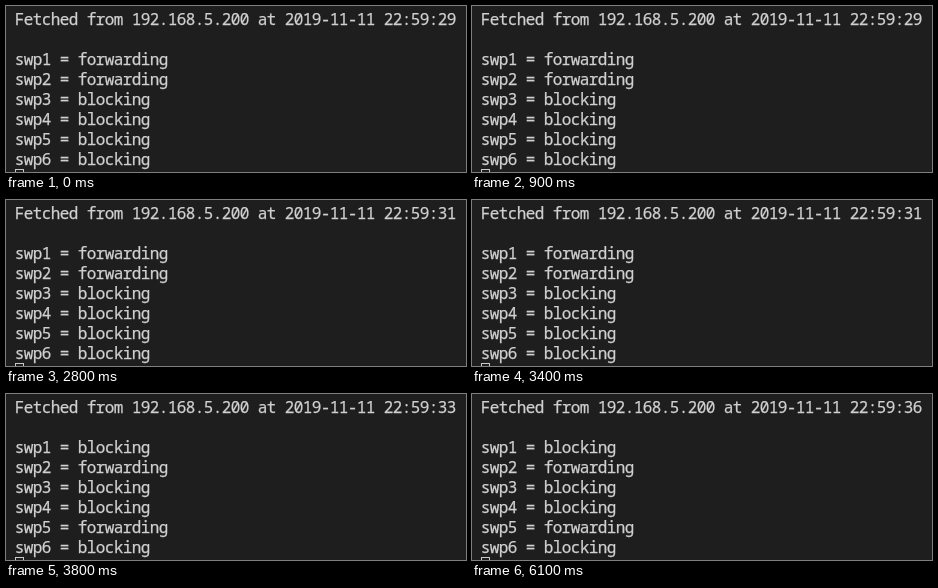
These frames come from a looping animation (460x166 px, 7.2 s). An HTML page:

```html
<!DOCTYPE html>
<html lang="en">
<head>
<meta charset="utf-8">
<title>Port states</title>
<style>
  html, body { margin: 0; width: 100%; height: 100%; overflow: hidden; background: #1e1e1e; }
  svg { display: block; width: 460px; height: 166px; }
  text {
    font: 16px "Noto Sans Mono", "DejaVu Sans Mono", monospace;
    letter-spacing: -.6px; /* 9px cells */
    fill: #d0d0d0; stroke: #d0d0d0; stroke-width: .25px;
    white-space: pre;
  }
  .cursor { fill: none; stroke: #c8c8c8; }

  /* Hard switches on one 7.2 s clock: 1.6 s, 3.6 s, 3.7 s and 5.6 s */
  .timed { visibility: hidden; animation: 7.2s step-end infinite; }
  .first  { animation-name: first; }
  .second { animation-name: second; }
  .third  { animation-name: third; }
  .fourth { animation-name: fourth; }
  .before { animation-name: before; }
  .empty  { animation-name: empty; }
  .after  { animation-name: after; }
  .filled { animation-name: filled; }
  @keyframes first  { 0% { visibility: visible } 22.222%, 100% { visibility: hidden } }
  @keyframes second { 0% { visibility: hidden } 22.222% { visibility: visible } 50%, 100% { visibility: hidden } }
  @keyframes third  { 0% { visibility: hidden } 50% { visibility: visible } 77.777%, 100% { visibility: hidden } }
  @keyframes fourth { 0% { visibility: hidden } 77.777%, 100% { visibility: visible } }
  @keyframes before { 0% { visibility: visible } 50%, 100% { visibility: hidden } }
  @keyframes empty  { 0% { visibility: hidden } 50% { visibility: visible } 51.388%, 100% { visibility: hidden } }
  @keyframes after  { 0% { visibility: hidden } 51.388%, 100% { visibility: visible } }
  @keyframes filled { 0% { visibility: visible } 50% { visibility: hidden } 51.388%, 100% { visibility: visible } }
</style>
</head>
<body>
<svg viewBox="0 0 460 166">
  <text x="8.7" y="19">Fetched from 192.168.5.200 at 2019-11-11 22:59:</text>
  <text class="timed first" x="431.7" y="19">29</text>
  <text class="timed second" x="431.7" y="19">31</text>
  <text class="timed third" x="431.7" y="19">33</text>
  <text class="timed fourth" x="431.7" y="19">36</text>

  <g class="timed before">
    <text x="8.7" y="59">swp1 = forwarding</text>
    <text x="8.7" y="139">swp5 = blocking</text>
  </g>
  <g class="timed after">
    <text x="8.7" y="59">swp1 = blocking</text>
    <text x="8.7" y="139">swp5 = forwarding</text>
  </g>
  <g class="timed filled">
    <text x="8.7" y="79">swp2 = forwarding</text>
    <text x="8.7" y="99">swp3 = blocking</text>
    <text x="8.7" y="119">swp4 = blocking</text>
    <text x="8.7" y="159">swp6 = blocking</text>
    <rect class="cursor" x="9.5" y="163.5" width="8" height="19"/>
  </g>
  <rect class="cursor timed empty" x="9.5" y="43.5" width="8" height="19"/>
</svg>
</body>
</html>
```
